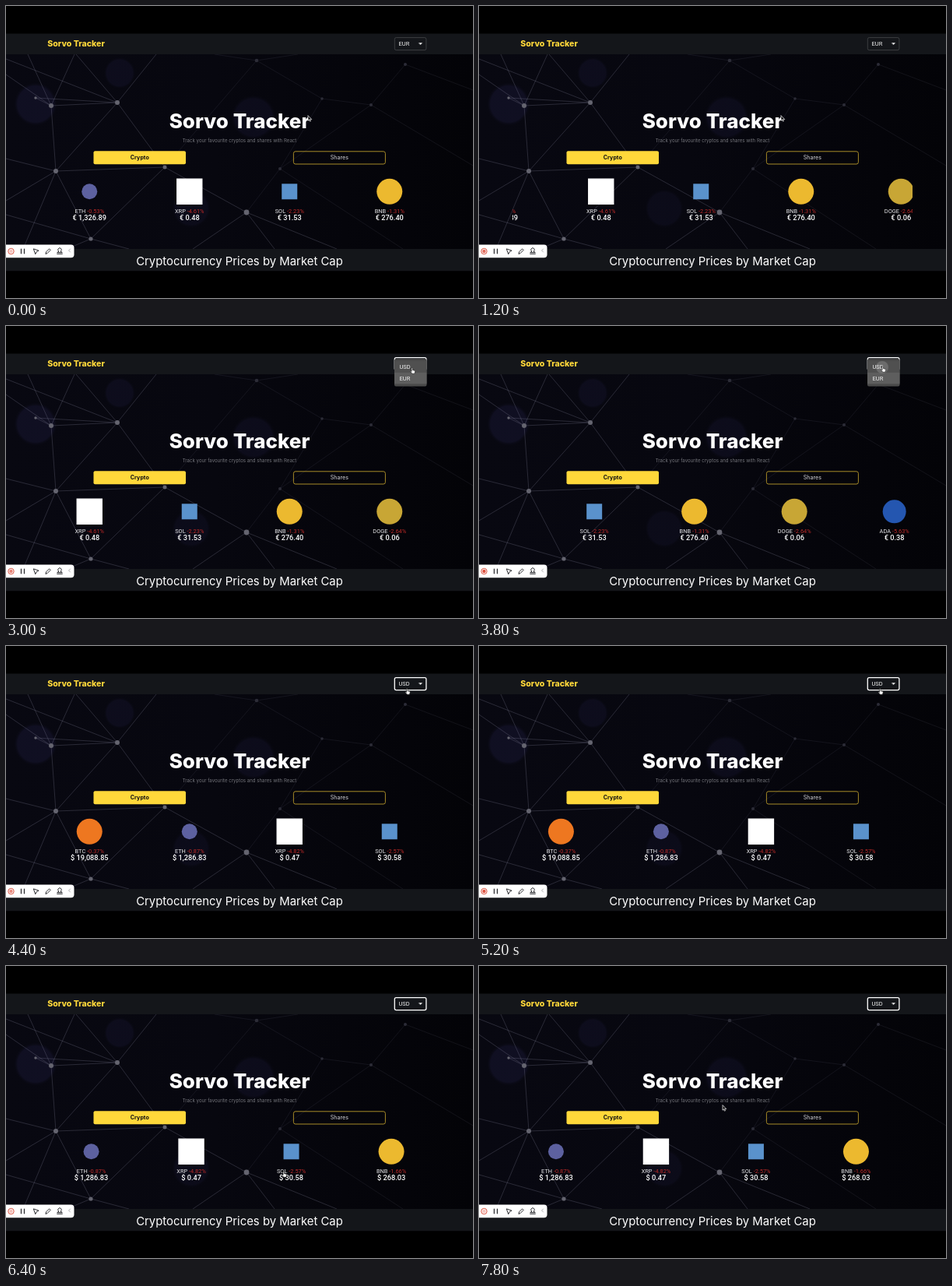
An HTML page with a canvas for the animation above (8000 ms loop, 600 by 375 pixels).

```html
<!DOCTYPE html>
<html lang="en">
<head>
<meta charset="utf-8">
<title>Sorvo Tracker</title>
<style>
html, body { margin: 0; width: 100%; height: 100%; overflow: hidden; background: #000; }
canvas { display: block; width: 600px; height: 375px; }
</style>
</head>
<body>
<canvas id="stage"></canvas>
<script>
const canvas = document.getElementById('stage');
const ratio = window.devicePixelRatio || 1;
canvas.width = 600 * ratio;
canvas.height = 375 * ratio;
const c = canvas.getContext('2d');

const LOOP = 8000, STEP = 200;
const SLOT = 128.5, LEFT = 43, RIGHT = 557, SLIDE = 1500;
const MENU_OPEN = 2200, MENU_CLOSE = 4000, RELOAD = 4160;
const INTER = 'Inter, sans-serif', ROBOTO = 'Roboto, sans-serif';
const GOLD = '#ffd83a', BAR = '#14161a';

const ICONS = {
  BTC: ['circle', 16.5, '#ee7720'],
  ETH: ['circle', 10, '#5d61a0'],
  XRP: ['square', 16.7, '#fff'],
  SOL: ['square', 10, '#5a92cc'],
  BNB: ['circle', 16.5, '#ecb92f'],
  DOGE: ['circle', 16.5, '#c8a635'],
  ADA: ['circle', 15, '#2456b0']
};
const EUR = [['ETH', '-0.53', '1,326.89'], ['XRP', '-4.61', '0.48'], ['SOL', '-2.23', '31.53'],
  ['BNB', '-1.31', '276.40'], ['DOGE', '-2.64', '0.06'], ['ADA', '-5.63', '0.38']];
const USD = [['BTC', '-0.37', '19,088.85'], ['ETH', '-0.87', '1,286.83'], ['XRP', '-4.82', '0.47'],
  ['SOL', '-2.57', '30.58'], ['BNB', '-1.66', '268.03']];

// Time, x, y of the pointer tip
const POINTER = [[0, 388, 141], [1400, 388, 141], [2000, 522, 48], [2200, 522, 48], [2600, 521, 54],
  [3000, 521, 54], [3800, 518, 52], [4200, 514.5, 55], [5200, 514.5, 55], [6200, 356, 264],
  [6500, 356, 264], [7200, 526, 41], [7800, 313, 179], [8000, 313, 179]];

const NODES = [[143, 124, 3], [58, 128, 3], [64, 212, 3], [204, 207, 2.5], [309, 265, 3.4], [109, 299, 2.6],
  [352, 209, 2], [322, 70, 2.3], [406, 119, 1.8], [469, 127, 2], [513, 75, 2], [38, 118, 1.7]];
const LINKS = ['0-1', '0-2', '0-3', '0-11', '1-11', '1-2', '2-3', '2-5', '3-4', '3-5', '3-7', '4-6',
  '7-8', '8-9', '9-10', '6-9', '6-8'];
// Threads that run from a node to a point on the edge of the hero
const THREADS = [[0, 0, 68], [0, 193, 62], [0, 90, 62], [1, 0, 88], [1, 28, 62], [1, 88, 62], [2, 0, 250],
  [2, 0, 196], [2, 22, 312], [5, 0, 268], [5, 78, 312], [5, 158, 312], [4, 240, 312], [4, 345, 312],
  [4, 425, 312], [6, 510, 312], [7, 268, 62], [7, 375, 62], [10, 600, 108], [9, 600, 205]];

const clamp = v => Math.max(0, Math.min(1, v));
const smooth = v => v * v * (3 - 2 * v);

// CSS "ease": cubic-bezier(.25, .1, .25, 1)
function ease(x) {
  if (x <= 0 || x >= 1) return clamp(x);
  let low = 0, high = 1, s;
  for (let i = 0; i < 20; i++) {
    s = (low + high) / 2;
    if (.75 * s * (1 - s) + s ** 3 < x) low = s; else high = s;
  }
  return .3 * s * (1 - s) ** 2 + 3 * s * s * (1 - s) + s ** 3;
}
const slide = (t, start) => ease((t - start) / SLIDE);

function text(str, x, y, font, color, align = 'left') {
  c.font = font;
  c.fillStyle = color;
  c.textAlign = align;
  c.fillText(str, x, y);
}
function box(x, y, w, h, color, radius = 0) {
  c.beginPath();
  c.roundRect(x, y, w, h, radius);
  c.fillStyle = color;
  c.fill();
}
function frame(x, y, w, h, color, width, radius) {
  c.beginPath();
  c.roundRect(x, y, w, h, radius);
  c.strokeStyle = color;
  c.lineWidth = width;
  c.stroke();
}
function disc(x, y, r, color) {
  c.beginPath();
  c.arc(x, y, r, 0, 7);
  c.fillStyle = color;
  c.fill();
}
function path(d, x, y, stroke, width, fill) {
  const shape = new Path2D(d);
  c.save();
  c.translate(x, y);
  c.lineJoin = c.lineCap = 'round';
  if (fill) { c.fillStyle = fill; c.fill(shape); }
  c.strokeStyle = stroke;
  c.lineWidth = width;
  c.stroke(shape);
  c.restore();
}
function glow(x, y, r, color) {
  const g = c.createRadialGradient(x, y, 0, x, y, r);
  g.addColorStop(0, color);
  g.addColorStop(.8, color);
  g.addColorStop(1, 'transparent');
  disc(x, y, r, g);
}

function drawHero() {
  c.save();
  c.beginPath();
  c.rect(0, 62, 600, 250);
  c.clip();
  const night = c.createLinearGradient(0, 0, 600, 0);
  night.addColorStop(0, '#080811');
  night.addColorStop(.45, '#07070f');
  night.addColorStop(1, '#030307');
  box(0, 62, 600, 250, night);
  glow(38, 126, 29, 'rgba(36,34,78,.28)');
  glow(146, 86, 21, 'rgba(36,34,78,.2)');
  glow(318, 143, 30, 'rgba(36,34,78,.2)');
  glow(238, 260, 26, 'rgba(36,34,78,.16)');
  const line = (a, x, y) => {
    c.beginPath();
    c.moveTo(a[0], a[1]);
    c.lineTo(x, y);
    c.lineWidth = .8;
    c.strokeStyle = `rgba(150,150,175,${a[0] < 315 ? .3 : .13})`;
    c.stroke();
  };
  for (const link of LINKS) {
    const [a, b] = link.split('-').map(i => NODES[i]);
    line(a[0] > b[0] ? a : b, ...(a[0] > b[0] ? b : a).slice(0, 2));
  }
  for (const [i, x, y] of THREADS) line(NODES[i], x, y);
  for (const [x, y, r] of NODES) disc(x, y, r, x < 315 ? '#64646f' : '#2c2c37');
  c.restore();

  text('Sorvo Tracker', 300, 156.7, '800 26px ' + INTER, '#fff', 'center');
  text('Track your favourite cryptos and shares with React', 300, 175.2, '6.1px ' + INTER, '#74757b', 'center');
  box(112.5, 186.3, 118.5, 17, GOLD, 2);
  text('Crypto', 171.8, 197.3, '700 7.1px ' + INTER, '#111', 'center');
  frame(369.4, 186.8, 118, 16.2, '#b99a2c', .9, 2.5);
  text('Shares', 428.3, 197.3, '7.1px ' + INTER, '#d8d8da', 'center');
}

function drawCoin([name, change, price], x, sign) {
  const [shape, r, color] = ICONS[name];
  if (shape === 'circle') disc(x, 238.3, r, color);
  else box(x - r, 238.3 - r, 2 * r, 2 * r, color);
  const font = '7.4px ' + ROBOTO;
  c.font = font;
  const label = name + ' ', delta = change + '%';
  const width = c.measureText(label).width;
  const left = x - (width + c.measureText(delta).width) / 2;
  text(label, left, 265.6, font, '#e8e8ea');
  text(delta, left + width, 265.6, font, '#bd2a27');
  text(sign + ' ' + price, x, 275.3, '500 9.2px ' + ROBOTO, '#fff', 'center');
}

function drawCarousel(t) {
  const reloaded = t >= RELOAD;
  const shift = reloaded ? slide(t, 5160) + slide(t, 7682) : slide(t, 666) + slide(t, 3201);
  c.save();
  c.beginPath();
  c.rect(LEFT, 215, RIGHT - LEFT, 70);
  c.clip();
  (reloaded ? USD : EUR).forEach((coin, i) =>
    drawCoin(coin, LEFT + SLOT * (i + .5 - shift), t < MENU_CLOSE ? '€' : '$'));
  c.restore();
}

function drawSelect(t) {
  const focused = t >= MENU_OPEN;
  frame(499.3, 40.6, 40.6, 16, focused ? '#fff' : '#46484b', focused ? 1.3 : .8, 2);
  text(t < MENU_CLOSE ? 'EUR' : 'USD', 504.5, 50.9, '7.5px ' + ROBOTO, '#f0f0f0');
  path('M-2 -1H2L0 1Z', 532.6, 48.6, '#fff', .4, '#fff');
  if (!focused || t >= MENU_CLOSE) return;
  box(499, 42.3, 41.5, 35.2, '#4a4a4a', 2);
  box(499, 45, 41.5, 14.7, '#505050');
  box(499, 59.7, 41.5, 14.6, '#5e5e5e');
  if (t >= 3700) disc(518, 53, 8, 'rgba(150,150,150,.4)');
  text('USD', 505.5, 54.7, '7.5px ' + ROBOTO, '#f0f0f0');
  text('EUR', 505.5, 69.7, '7.5px ' + ROBOTO, '#f0f0f0');
}

function drawRecorder(t) {
  const ink = '#2c2d31', red = '#d9402c';
  box(-6, 306.5, 93.5, 16.8, '#fff', 4);
  const pulse = .5 - .5 * Math.cos(t / 706 * 2 * Math.PI);
  c.beginPath();
  c.arc(6.5, 315, 3.7, 0, 7);
  c.strokeStyle = red;
  c.lineWidth = .9;
  c.stroke();
  c.globalAlpha = .3 + .7 * pulse;
  disc(6.5, 315, 2.2, red);
  c.globalAlpha = 1;
  path('M-2 -2.8V2.8M2 -2.8V2.8', 21.5, 315, ink, 1.3);
  path('M-3 -3L3.4 -.8L.6 .6L-.8 3.4Z', 38.7, 315, ink, 1);
  path('M-3 3L-2.4 .8L1.6 -3.2L3.2 -1.6L-.8 2.4Z', 54, 315, ink, 1);
  path('M-3.3 3.3H3.3M-3 1.4L-1 0A2.2 2.2 0 1 1 1 0L3 1.4Z', 69, 315, ink, 1);
  path('M1 -2L-1 0L1 2', 81.5, 314, '#8a8b90', .7);
}

function drawPointer(t) {
  const i = POINTER.findIndex(p => p[0] > t);
  const [a, b] = [POINTER[i - 1], POINTER[i]];
  const k = smooth((t - a[0]) / (b[0] - a[0]));
  const x = a[1] + (b[1] - a[1]) * k, y = a[2] + (b[2] - a[2]) * k;
  const overSelect = x > 498 && x < 541 && y > 39 && y < 78;
  const overCoin = x > LEFT && x < RIGHT && y > 220 && y < 279;
  if (overSelect || overCoin)
    path('M0 0Q1 -.6 1.4 .3V2.6L4.2 3.3Q5 3.7 4.6 5L3.9 7.2H.8L-1.4 4.4Q-1 3.4 0 4.2Z', x, y, '#111', .6, '#fff');
  else
    path('M0 0V6.2L1.4 4.9L2.5 7.2L3.5 6.7L2.5 4.6H4.4Z', x, y, '#fff', .7, '#111');
}

function draw(t) {
  c.setTransform(ratio, 0, 0, ratio, 0, 0);
  box(0, 0, 600, 375, '#000');
  drawHero();
  box(0, 35.5, 600, 26.5, BAR);
  box(0, 312, 600, 28.3, BAR);
  text('Sorvo Tracker', 53.3, 52, '800 10.6px ' + INTER, GOLD);
  text('Cryptocurrency Prices by Market Cap', 300, 333, '14.9px ' + INTER, '#fff', 'center');
  drawCarousel(t);
  drawSelect(t);
  drawRecorder(t);
  drawPointer(t);
}

// The picture advances five times a second
function tick() {
  draw(Math.floor(performance.now() % LOOP / STEP) * STEP);
  requestAnimationFrame(tick);
}
tick();
</script>
</body>
</html>
```
